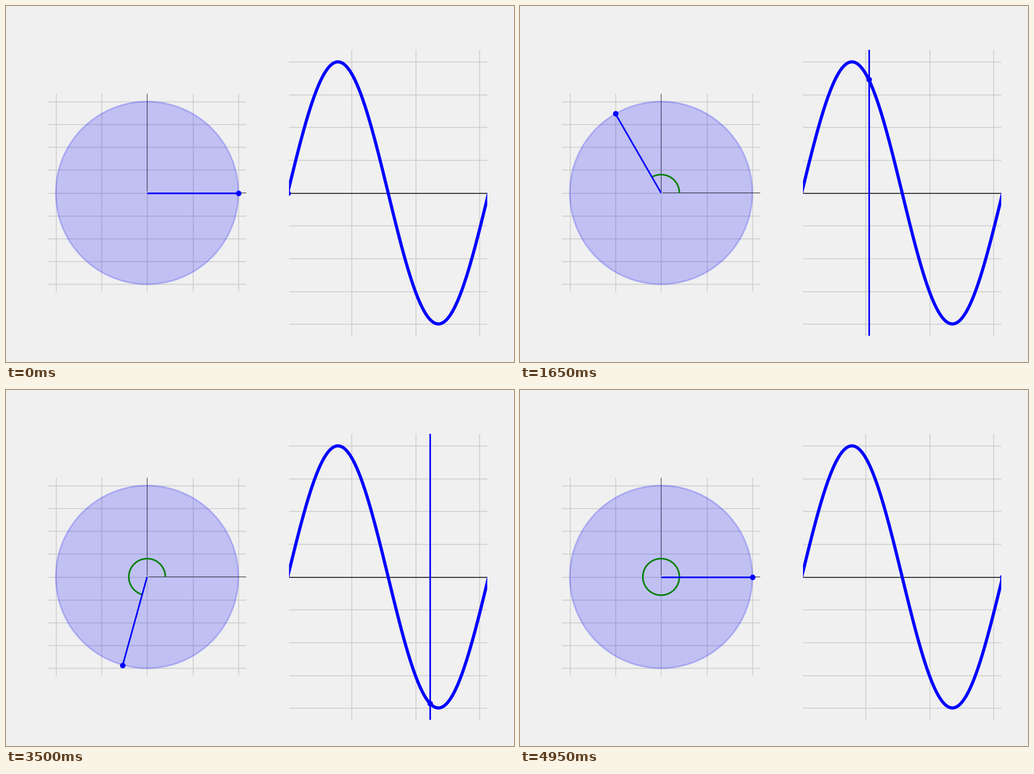
Recreate the animation shown at these times as a matplotlib script. Size 894 by 626 pixels, loop 5000 ms.

```python
import numpy as np
import matplotlib.pyplot as plt
from matplotlib.animation import FuncAnimation

FRAMES = 100
INTERVAL = 50
ARC_RADIUS = 0.2
LIMIT = 1.1

plt.style.use("fivethirtyeight")
fig, (left, right) = plt.subplots(1, 2, figsize=(894 / 100, 626 / 100), dpi=100)
fig.subplots_adjust(left=0.08, right=0.95, bottom=0.07, top=0.88, wspace=0.2)

angles = np.linspace(0, 2 * np.pi, FRAMES)


def style_axes(ax, xlim, xticks):
    ax.set_xlim(*xlim)
    ax.set_ylim(-LIMIT, LIMIT)
    ax.set_xticks(xticks)
    ax.set_yticks(np.arange(-1, 1.01, 0.25))
    ax.tick_params(labelbottom=False, labelleft=False, length=0)


def half_axis(tip):
    arrow = dict(arrowstyle="-", color="black", linewidth=0.5)
    left.annotate("", xy=tip, xytext=(0, 0), arrowprops=arrow)


# Unit circle
style_axes(left, (-LIMIT, LIMIT), np.arange(-1, 1.01, 0.5))
left.set_aspect("equal")
left.add_patch(plt.Circle((0, 0), 1, color="blue", alpha=0.2, linewidth=2))
half_axis((LIMIT, 0))
half_axis((0, LIMIT))
arc, = left.plot([], [], color="green", linewidth=2, zorder=4)
radius, = left.plot([], [], color="blue", linewidth=2, zorder=5)
tip_dot, = left.plot([], [], "o", color="blue", zorder=5)

# Sine wave
style_axes(right, (0, 2 * np.pi), [0, 2, 4, 6])
right.axhline(0, color="black", linewidth=1)
right.plot(angles, np.sin(angles), color="blue", linewidth=4)
cursor = right.axvline(0, color="blue", linewidth=2)
wave_dot, = right.plot([], [], "o", color="blue")


def update(frame):
    theta = angles[frame]
    x, y = np.cos(theta), np.sin(theta)
    sweep = np.linspace(0, theta, 120)
    arc.set_data(ARC_RADIUS * np.cos(sweep), ARC_RADIUS * np.sin(sweep))
    radius.set_data([0, x], [0, y])
    tip_dot.set_data([x], [y])
    cursor.set_xdata([theta, theta])
    wave_dot.set_data([theta], [y])
    return arc, radius, tip_dot, cursor, wave_dot


anim = FuncAnimation(fig, update, frames=FRAMES, interval=INTERVAL,
                     repeat=True, repeat_delay=0, blit=False)
plt.show()
```
